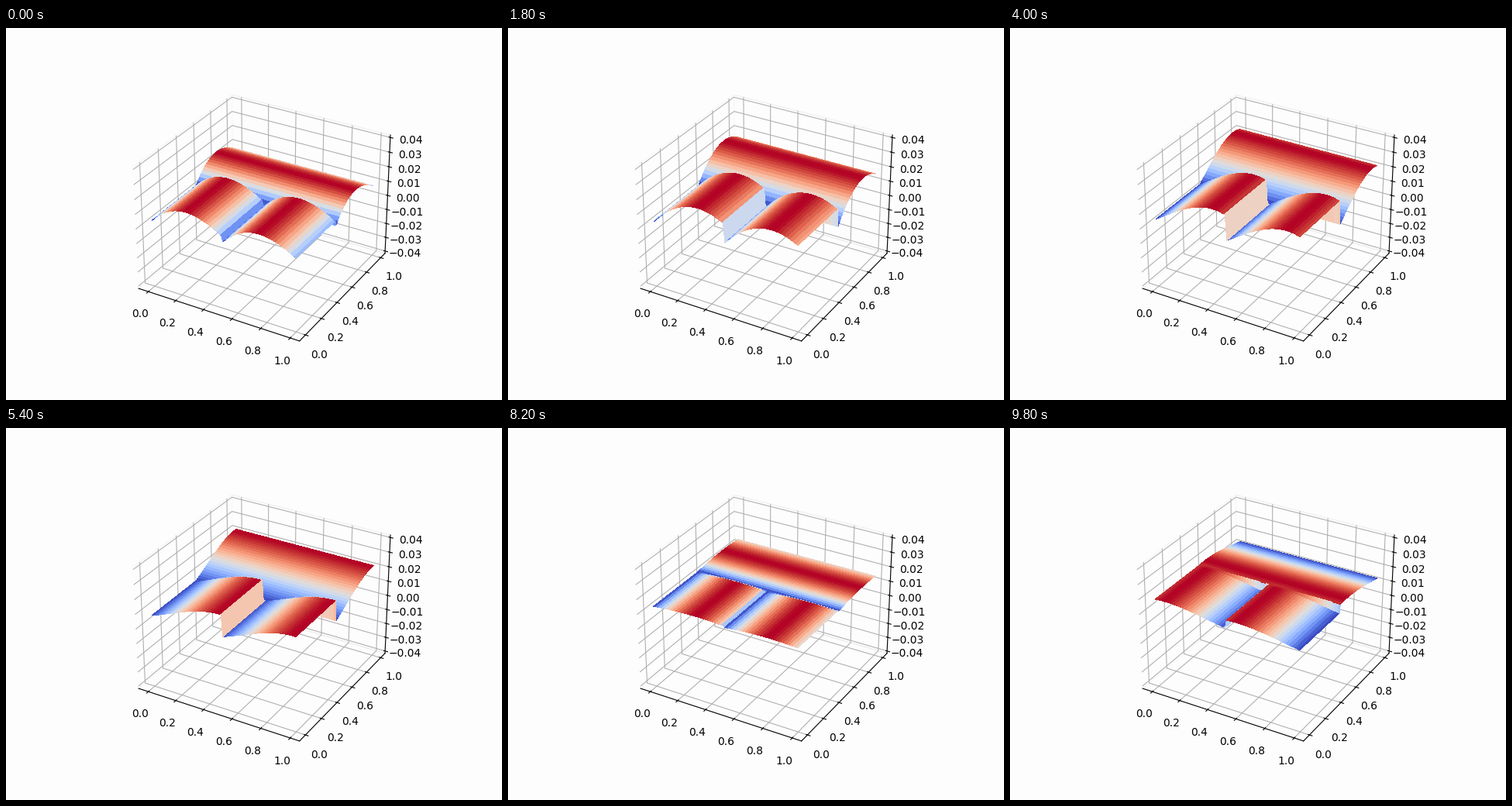
A matplotlib script for the animation above (10 s loop, 640 by 480 pixels).

```python
import numpy as np
import matplotlib.pyplot as plt
from matplotlib.animation import FuncAnimation

FRAMES, STEP = 50, 200          # count, ms
N = 100                         # samples per axis
PAD = 25 / 24                   # room between limits and box

# Key poses: height of one cell's profile at s = 0, 1/3, 2/3, 1 (times in s)
TIMES = np.array([0, 1, 2.8, 5.4, 7, 8.2, 9.8])
POSES = np.array([
    [4.5, 15.7, 15.6, 7.6],
    [4.0, 17.5, 19.2, 12.6],
    [4.1, 17.1, 23.5, 19.2],
    [7.9, 14.4, 20.2, 22.2],
    [11.4, 14.0, 16.8, 18.1],
    [14.1, 15.4, 15.7, 14.9],
    [18.9, 18.7, 16.3, 13.3],
]) / 1000
SLOPES = np.gradient(POSES, TIMES, axis=0)

grid = np.arange(N) / N
X, Y = np.meshgrid(grid, grid)
S = (2 * grid) % 1


def pose(t):
    """Cubic Hermite blend between the key poses."""
    i = min(np.searchsorted(TIMES, t, side="right") - 1, len(TIMES) - 2)
    h = TIMES[i + 1] - TIMES[i]
    u = (t - TIMES[i]) / h
    rise = u * u * (3 - 2 * u)
    return (POSES[i] * (1 - rise) + POSES[i + 1] * rise
            + h * u * (1 - u) * ((1 - u) * SLOPES[i] - u * SLOPES[i + 1]))


def height(t):
    """Two cells side by side in front, one wide cell behind."""
    profile = np.polyval(np.polyfit(np.arange(4) / 3, pose(t), 3), S)
    return np.where(Y < 0.5, profile[None, :], profile[:, None])


fig = plt.figure(figsize=(6.4, 4.8), dpi=100, facecolor="#fdfdfd")
ax = fig.add_subplot(projection="3d", facecolor="#fdfdfd")
mid = grid[-1] / 2
half = mid * 1.1 * PAD
ax.set_xlim(mid - half, mid + half)
ax.set_ylim(mid - half, mid + half)
ax.set_zlim(-0.04 * PAD, 0.04 * PAD)
for axis in (ax.xaxis, ax.yaxis, ax.zaxis):
    axis.pane.set_fill(False)

surfaces = []


def draw(k):
    while surfaces:
        surfaces.pop().remove()
    surfaces.append(ax.plot_surface(X, Y, height(k * STEP / 1000), cmap="coolwarm",
                                    linewidth=0, antialiased=False))
    return surfaces


anim = FuncAnimation(fig, draw, frames=FRAMES, interval=STEP,
                     init_func=lambda: draw(0), repeat=True, repeat_delay=0)
plt.show()
```
